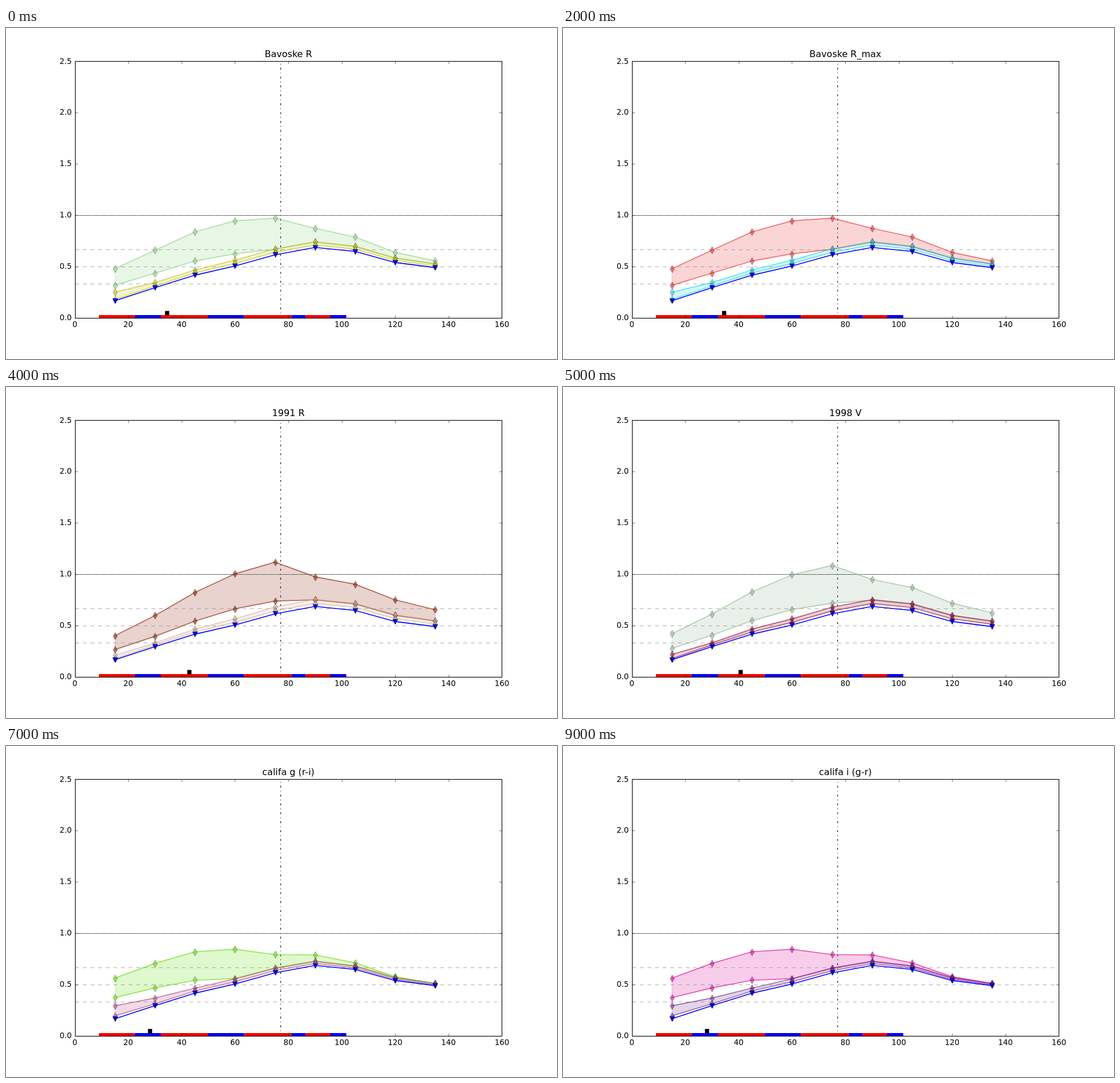
Animation, 966 px wide and 580 px high, one loop 10000 ms. Source, as an HTML page with a canvas:

```html
<!DOCTYPE html>
<html lang="en">
<head>
<meta charset="utf-8">
<title>Stability curves</title>
<style>
  html, body { margin: 0; width: 100%; height: 100%; overflow: hidden; background: #fff; }
  canvas { display: block; }
</style>
</head>
<body>
<canvas id="stage" width="966" height="580"></canvas>
<script>
const ctx = document.getElementById('stage').getContext('2d');
const POINT = 80 / 72; // pixels per typographic point
const LEFT = 120.75, RIGHT = 869.4, TOP = 58, BOTTOM = 507.5;
const px = x => LEFT + x * (RIGHT - LEFT) / 160;
const py = y => BOTTOM - y * (BOTTOM - TOP) / 2.5;
const crisp = v => Math.round(v) + 0.5;

// title, disc scale length, stellar density, colours of the outer and inner band
const scenes = [
  ['Bavoske R', 34.4, 1.03, '140,208,132', '195,195,25'],
  ['Bavoske R_min', 34.4, 1.03, '110,145,210', '215,130,50'],
  ['Bavoske R_max', 34.4, 1.03, '235,45,45', '30,214,227'],
  ['Corvan-Istel J', 14, 0.5, '140,92,118', '115,178,167'],
  ['1991 R', 42.9, 1, '140,35,10', '212,176,148'],
  ['1998 V', 40.6, 1.01, '143,182,145', '150,15,60'],
  ['1998 R', 40.6, 1.01, '115,135,190', '170,110,30'],
  ['califa g (r-i)', 28, 1.02, '98,219,5', '175,72,130'],
  ['califa r (g-i)', 28, 1.02, '65,165,200', '115,105,35'],
  ['califa i (g-r)', 28, 1.02, '220,5,150', '115,47,138']
];

const gas = [.164, .292, .414, .503, .612, .684, .645, .537, .487];
const radii = gas.map((_, i) => 15 * (i + 1));

// Each edge follows the stars or the gas, whichever is less stable.
function bandEdges(scale, density) {
  const ratio = 1.515, starLimit = 80;
  const edges = { outer: [], outerLow: [], inner: [], innerLow: [] };
  radii.forEach((r, i) => {
    const g = gas[i];
    const stars = density * (.1486 + .0002387 * r ** 2.1) * Math.exp(-.92 * (r - 43) / scale);
    const outer = Math.max(r < starLimit ? stars : 0, g + 30 / (r + 50) * stars ** 2);
    const inner = Math.max(.52 * stars, g + .06 * stars);
    edges.outer.push(outer);
    edges.outerLow.push(Math.max(outer / ratio, g + .055 * stars));
    edges.inner.push(inner);
    edges.innerLow.push(Math.max(inner / ratio, g + .026 * stars));
  });
  return edges;
}

function text(label, x, y, size, align) {
  ctx.font = `${size}px "DejaVu Sans", sans-serif`;
  ctx.textAlign = align;
  ctx.fillStyle = '#000';
  ctx.fillText(label, x, y);
}

function line(x1, y1, x2, y2, color, width, dash = []) {
  ctx.setLineDash(dash);
  ctx.strokeStyle = color;
  ctx.lineWidth = width;
  ctx.beginPath();
  ctx.moveTo(x1, y1);
  ctx.lineTo(x2, y2);
  ctx.stroke();
  ctx.setLineDash([]);
}

const toPoints = values => values.map((v, i) => [px(radii[i]), py(v)]);

function trace(points) {
  ctx.beginPath();
  points.forEach(([x, y]) => ctx.lineTo(x, y));
}

function fillBand(upper, lower, rgb) {
  trace([...toPoints(upper), ...toPoints(lower).reverse()]);
  ctx.closePath();
  ctx.fillStyle = ctx.strokeStyle = `rgba(${rgb},.2)`;
  ctx.lineWidth = POINT;
  ctx.fill();
  ctx.stroke();
}

const diamond = [[0, -6.28], [3.77, 0], [0, 6.28], [-3.77, 0]];
const triangle = [[-4.44, -4.44], [4.44, -4.44], [0, 4.44]];

function plot(values, rgb, marker, alpha) {
  const points = toPoints(values);
  trace(points);
  ctx.strokeStyle = ctx.fillStyle = `rgba(${rgb},${alpha})`;
  ctx.lineWidth = 1.5 * POINT;
  ctx.stroke();
  ctx.strokeStyle = `rgba(0,0,0,${alpha})`;
  ctx.lineWidth = 0.5 * POINT;
  for (const [x, y] of points) {
    trace(marker.map(([dx, dy]) => [crisp(x) + dx, crisp(y) + dy]));
    ctx.closePath();
    ctx.fill();
    ctx.stroke();
  }
}

function drawReferenceLines() {
  const left = crisp(LEFT), right = crisp(RIGHT);
  for (const level of [1 / 3, 1 / 2, 2 / 3, 1]) {
    const y = crisp(py(level));
    if (level === 1) line(left, y, right, y, '#666', POINT);
    line(left, y, right, y, 'rgba(128,128,128,.65)', POINT, [6 * POINT, 6 * POINT]);
  }
  const x = crisp(px(77));
  line(x, crisp(BOTTOM), x, TOP, '#000', POINT, [3, 5, 1, 5].map(v => v * POINT));
}

function drawStrip() {
  const edges = [9, 22.4, 32.3, 49.8, 63.4, 81.2, 86.5, 95.6, 101.7].map(px);
  for (let i = 0; i < edges.length - 1; i++) {
    ctx.fillStyle = i % 2 ? '#00f' : '#f00';
    ctx.fillRect(edges[i], 503, edges[i + 1] - edges[i], 5);
  }
}

function drawScaleMarker(scale) {
  const half = 3.7;
  ctx.fillStyle = '#000';
  ctx.fillRect(crisp(px(scale)) - half, crisp(py(.05)) - half, 2 * half, 2 * half);
}

function drawAxes() {
  const size = 12 * POINT, tick = 4 * POINT, width = 0.5 * POINT;
  const left = crisp(LEFT), right = crisp(RIGHT), top = crisp(TOP), bottom = crisp(BOTTOM);
  for (let v = 0; v <= 160; v += 20) {
    const x = crisp(px(v));
    line(x, bottom, x, bottom - tick, '#000', width);
    line(x, top, x, top + tick, '#000', width);
    text(v, px(v), 524, size, 'center');
  }
  for (let v = 0; v <= 2.5; v += 0.5) {
    const y = crisp(py(v));
    line(left, y, left + tick, y, '#000', width);
    line(right, y, right - tick, y, '#000', width);
    text(v.toFixed(1), LEFT - tick - 1, Math.round(py(v) + 4.6), size, 'right');
  }
  ctx.strokeStyle = '#000';
  ctx.lineWidth = POINT;
  ctx.strokeRect(left, top, right - left, bottom - top);
}

function drawScene([title, scale, density, outerColor, innerColor]) {
  const { outer, outerLow, inner, innerLow } = bandEdges(scale, density);
  ctx.fillStyle = '#fff';
  ctx.fillRect(0, 0, 966, 580);
  fillBand(outer, outerLow, outerColor);
  fillBand(inner, innerLow, innerColor);
  drawReferenceLines();
  for (const values of [outer, outerLow]) plot(values, outerColor, diamond, .6);
  for (const values of [inner, innerLow]) plot(values, innerColor, diamond, .6);
  plot(gas, '0,0,255', triangle, 1);
  drawStrip();
  drawScaleMarker(scale);
  drawAxes();
  text(title, (LEFT + RIGHT) / 2, 51, 14.4 * POINT, 'center');
}

let shown = -1;
function tick() {
  const index = Math.floor(performance.now() / 1000) % scenes.length;
  if (index !== shown) drawScene(scenes[shown = index]);
  requestAnimationFrame(tick);
}
tick();
</script>
</body>
</html>
```
